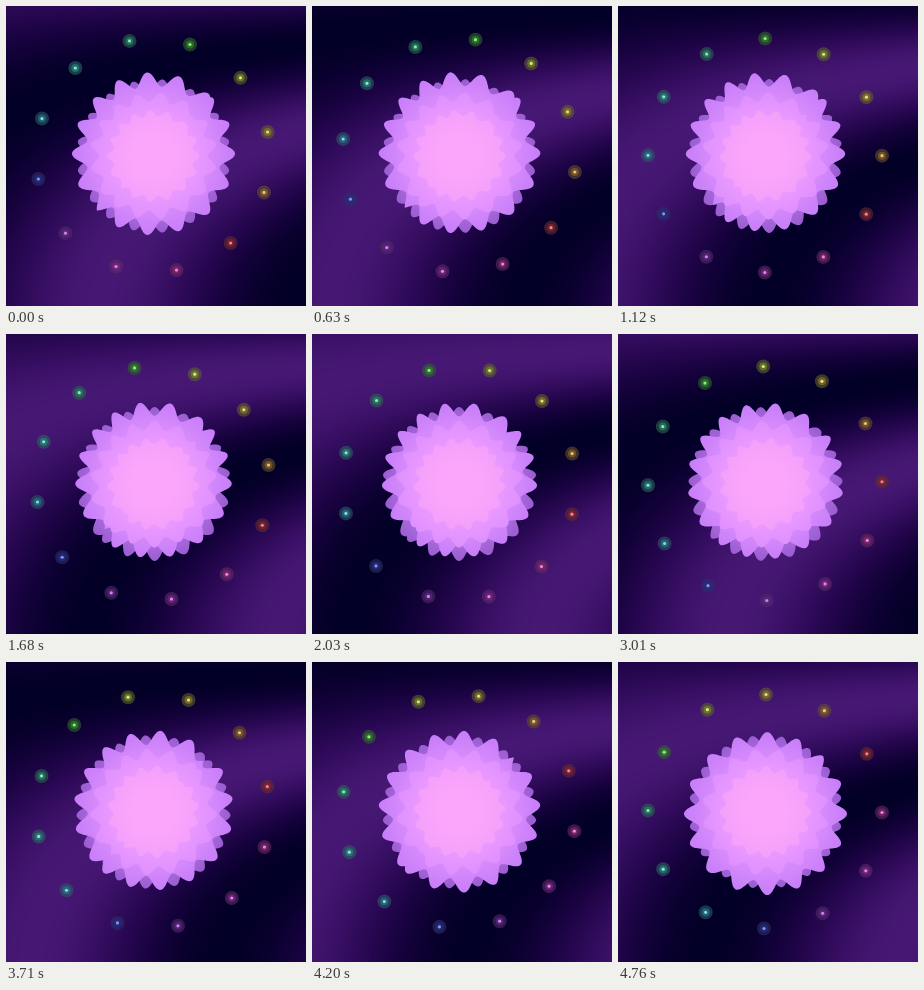
Write an HTML page with a canvas that moves like this. It is 300 px wide and 300 px high and loops after 4830 ms.

```html
<!DOCTYPE html>
<html>
<head>
<meta charset="utf-8">
<style>
html, body { margin: 0; width: 300px; height: 300px; overflow: hidden; background: #020024; }
canvas { display: block; }
</style>
</head>
<body>
<canvas id="stage" width="300" height="300"></canvas>
<script>
const SIZE = 300, STEP = 70, LOOP = 4830, TAU = Math.PI * 2;
const ctx = document.getElementById('stage').getContext('2d');
const sky = ctx.createImageData(SIZE, SIZE);

// Curved light and dark waves that bend around the lower right corner
function drawSky(t) {
  let p = 0;
  for (let y = 0; y < SIZE; y++) {
    const bend = 230 * Math.sin(y / 200);
    for (let x = 0; x < SIZE; x++) {
      const phase = 2 * t - 4.97 + 0.001 * x + bend * (0.015 + 0.0000667 * x);
      const light = 0.5 + 0.5 * Math.cos(phase);
      sky.data[p++] = 2 + 68 * light;
      sky.data[p++] = 24 * light * light;
      sky.data[p++] = 38 + 78 * light;
      sky.data[p++] = 255;
    }
  }
  ctx.putImageData(sky, 0, 0);
}

// Spiky ring: lobes drift from the upper right towards the lower left
function drawBurst(t, cy, radius, spike, offset, inner, outer) {
  const cx = 147.5, axis = Math.PI / 4;
  const fill = ctx.createRadialGradient(cx, cy, radius * 0.5, cx, cy, radius + spike);
  fill.addColorStop(0, inner);
  fill.addColorStop(1, outer);
  ctx.fillStyle = fill;
  ctx.beginPath();
  for (let i = -360; i < 360; i++) {
    const fromAxis = i * Math.PI / 360, a = fromAxis + axis;
    const sideways = Math.sin(a) ** 2;
    const drift = ((4.5 + 3.5 * t) * sideways + t * t * (1 - sideways)) * Math.PI / 180;
    const r = radius + spike * Math.cos(16 * (Math.abs(fromAxis) - drift) + offset);
    ctx.lineTo(cx + r * Math.cos(a), cy - r * Math.sin(a));
  }
  ctx.fill();
}

function drawFlower(t) {
  const swell = 2 * Math.cos(t * TAU / 4.76);
  const cy = 146 + 0.6 * (t - 1.7) ** 2;
  drawBurst(t, 150, 70, 7, Math.PI, '#c080f0', '#9a5cd0');
  drawBurst(t, cy, 72.5 + swell, 7, 0, '#e495ff', '#c67df8');
  drawBurst(t, 150, 59, 4.5, Math.PI, '#f09efd', '#de90ff');
  drawBurst(t, 150, 43, 3, 0, '#fba6fb', '#f3a0fc');
}

function disc(x, y, r, color) {
  ctx.fillStyle = color;
  ctx.beginPath();
  ctx.arc(x, y, r, 0, TAU);
  ctx.fill();
}

function drawBeads(frame) {
  for (let i = 0; i < 12; i++) {
    const a = 0.845 - 0.02 * frame - i * TAU / 12;
    const x = 147 + 117 * Math.cos(a), y = 149.5 + 117 * Math.sin(a);
    const hue = 30 * i - 6 + 14 * Math.cos((i - 1) * TAU / 4);
    disc(x, y, 7, `hsla(${hue}, 40%, 28%, .6)`);
    disc(x, y, 4, `hsla(${hue}, 60%, 34%, .65)`);
    disc(x, y, 1.6, `hsl(${hue}, 65%, 72%)`);
  }
}

const start = performance.now();
function tick() {
  const frame = Math.floor((performance.now() - start) % LOOP / STEP);
  const t = frame * STEP / 1000;
  drawSky(t);
  drawBeads(frame);
  drawFlower(t);
  requestAnimationFrame(tick);
}
tick();
</script>
</body>
</html>
```
